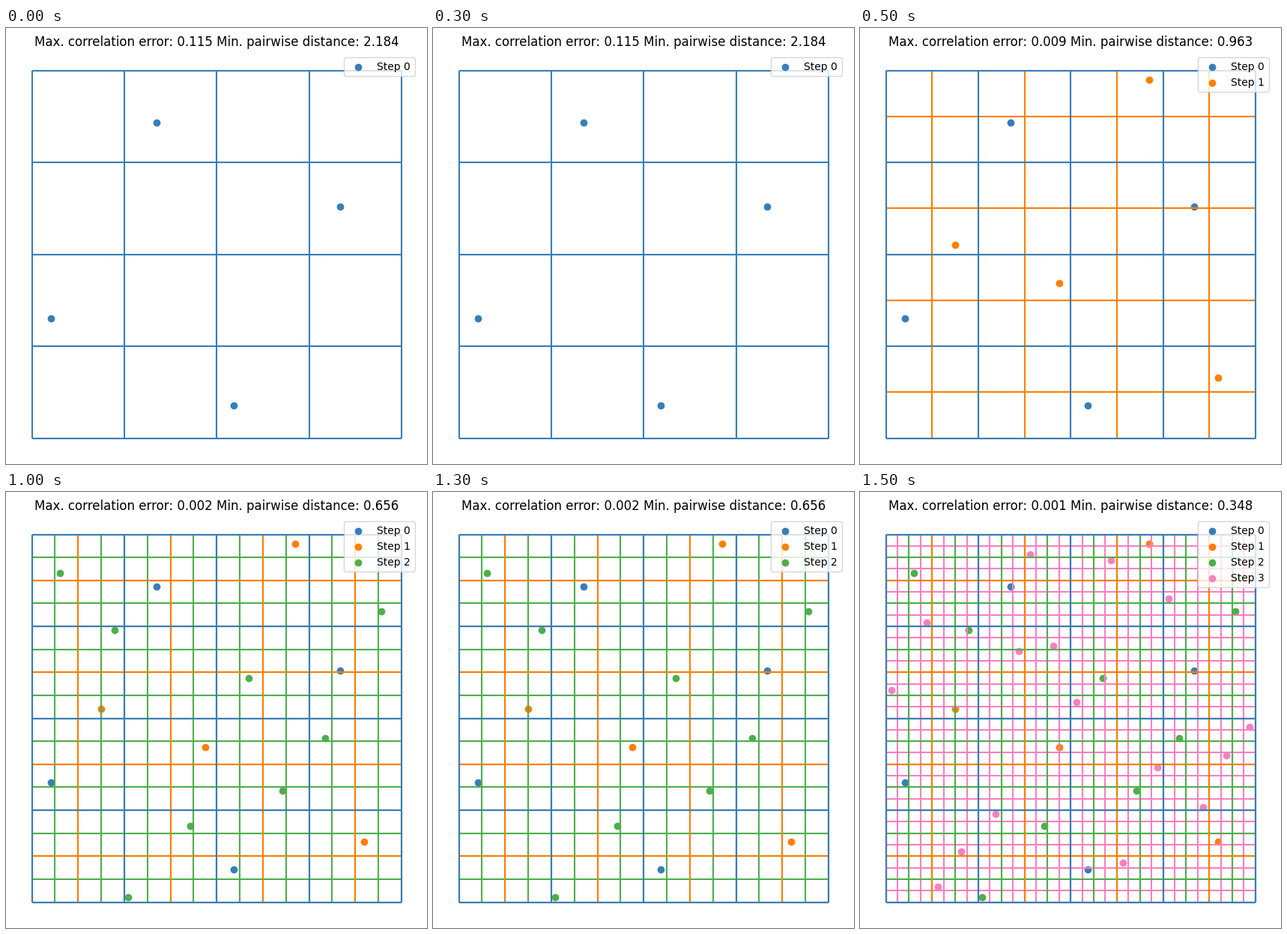
A matplotlib script that plays this animation: 562x581 px, repeating every 2 s.

```python
import matplotlib.pyplot as plt
import numpy as np
from matplotlib.animation import FuncAnimation

W, H, DPI = 562, 581, 100
LEFT, RIGHT, TOP, BOTTOM = 34.66, 527.84, 56.52, 546.52
MARGIN_X, MARGIN_Y = 24.66, 24.5

COLORS = ["#377eb8", "#ff7f00", "#4daf4a", "#f781bf"]
STATS = [(0.115, 2.184), (0.009, 0.963), (0.002, 0.656), (0.001, 0.348)]
KEY_SAMPLES = [
    [(201, 126), (446, 238), (60, 387), (304, 503)],
    [(386, 69), (127, 289), (266, 340), (478, 466)],
    [(72, 108), (145, 184), (501, 159), (324, 248),
     (426, 328), (369, 398), (246, 445), (163, 540)],
]
LAST_HEIGHTS = [264, 174, 526, 479, 429, 212, 83, 205,
                280, 91, 494, 367, 142, 420, 351, 313]


def cell_count(step):
    return 4 * 2 ** step


def fill_columns(taken_x, heights, cells):
    """Put one sample in the middle of each column that is still empty."""
    width = (RIGHT - LEFT) / cells
    taken = ((taken_x - LEFT) // width).astype(int)
    free = np.setdiff1d(np.arange(cells), taken)
    return np.column_stack([LEFT + (free + 0.5) * width, heights])


samples = [np.array(points) for points in KEY_SAMPLES]
samples.append(fill_columns(np.vstack(samples)[:, 0], LAST_HEIGHTS,
                            cell_count(len(samples))))

plt.rcParams["font.family"] = "DejaVu Sans"
fig = plt.figure(figsize=(W / DPI, H / DPI), dpi=DPI, facecolor="white")

# Data units are stage pixels, with y pointing down.
x0, x1 = LEFT - MARGIN_X, RIGHT + MARGIN_X
y0, y1 = TOP - MARGIN_Y, BOTTOM + MARGIN_Y
ax = fig.add_axes([x0 / W, 1 - y1 / H, (x1 - x0) / W, (y1 - y0) / H])


def draw_grid(step):
    ticks = cell_count(step) + 1
    style = dict(color=COLORS[step], linewidth=1.5, zorder=2)
    ax.hlines(np.linspace(TOP, BOTTOM, ticks), LEFT, RIGHT, **style)
    ax.vlines(np.linspace(LEFT, RIGHT, ticks), TOP, BOTTOM, **style)


def draw_samples(step):
    ax.scatter(*samples[step].T, color=COLORS[step],
               label=f"Step {step}", zorder=1)


def update(frame):
    ax.clear()
    ax.set_axis_off()
    for step in range(frame + 1):
        draw_samples(step)
    # Coarse grids lie over fine ones.
    for step in range(frame, -1, -1):
        draw_grid(step)
    ax.set_xlim(x0, x1)
    ax.set_ylim(y1, y0)
    error, distance = STATS[frame]
    ax.set_title(f"Max. correlation error: {error:.3f} "
                 f"Min. pairwise distance: {distance:.3f}", y=1.0)
    # This spacing makes rows a whole number of pixels apart.
    ax.legend(loc="upper right", labelspacing=0.504)
    return []


anim = FuncAnimation(fig, update, frames=len(STATS), interval=500,
                     init_func=lambda: [], repeat=True, repeat_delay=0)
plt.show()
```
